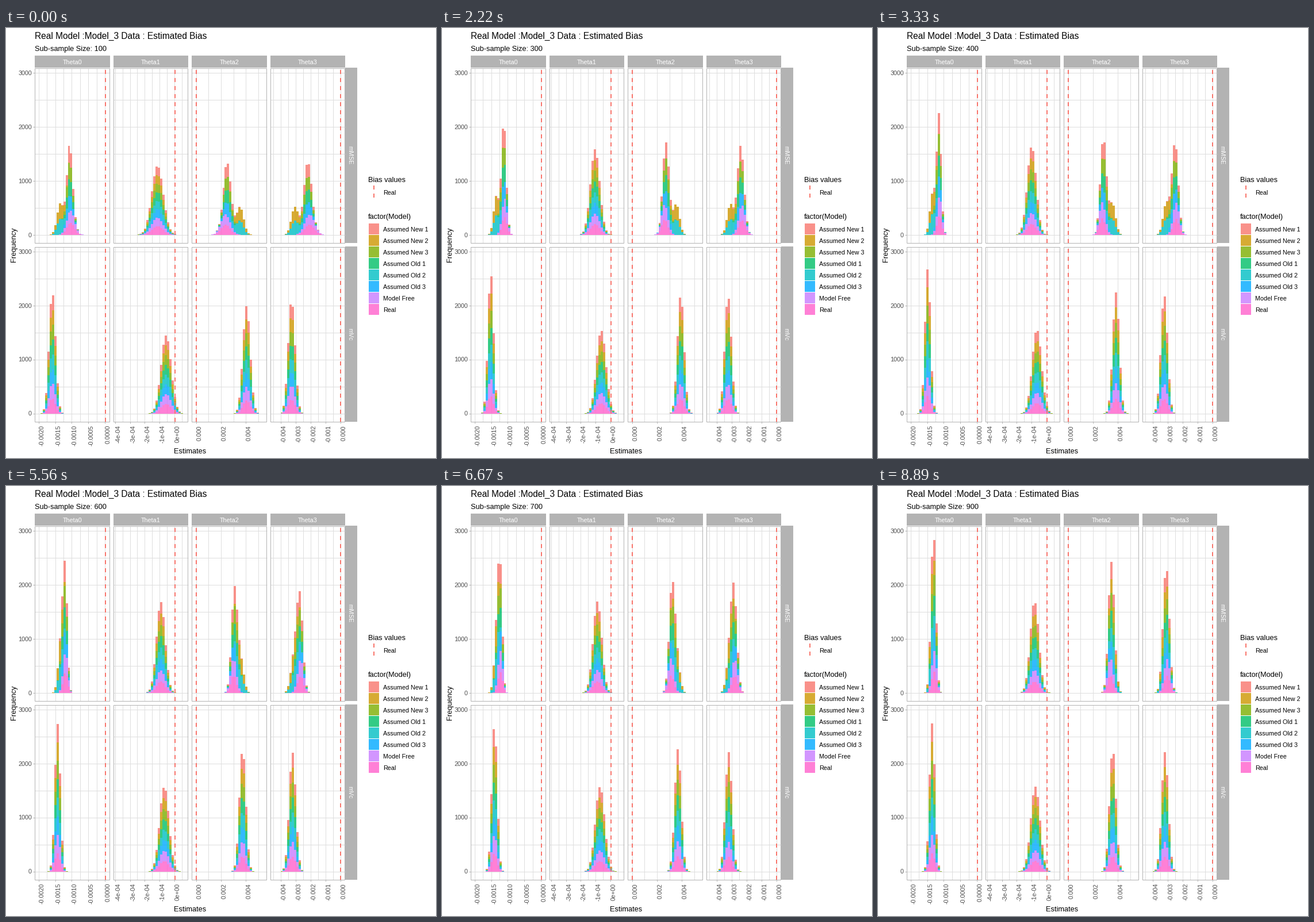
A matplotlib script for the animation above (10 s loop, 748 by 748 pixels).

```python
import numpy as np
import matplotlib.pyplot as plt
from matplotlib.animation import FuncAnimation
from matplotlib.collections import LineCollection, PolyCollection
from matplotlib.patches import Rectangle

plt.rcParams["font.family"] = "Liberation Sans"

SIZE, DPI = 748, 100
PX = 72 / DPI                      # points per pixel
GREY, GRID, TICK, RED = "#B3B3B3", "#DEDEDE", "#4D4D4D", "#F8766D"

MODELS = ["Assumed New 1", "Assumed New 2", "Assumed New 3", "Assumed Old 1",
          "Assumed Old 2", "Assumed Old 3", "Model Free", "Real"]
COLORS = ["#F8766D", "#CD9600", "#7CAE00", "#00BE67",
          "#00BFC4", "#00A9FF", "#C77CFF", "#FF61CC"]
EVERY, MAIN, SECOND, TRUE = [*range(8)], [0, 2, 3, 5], [1, 4], [6, 7]

RUNS = 1000                        # simulations per model
BIN = 3.95                         # bin width in pixels
PER_COUNT = 0.094                  # pixels per count
PANEL_W, PANEL_H, STEP, LEFT = 130.3, 304, 136.5, 50.3

ROWS = [("mMSE", 69.5, 360), ("mVc", 380.5, 671)]          # top, baseline
COLS = [("Theta0", 172.7, 28.9, lambda i: f"{i * 0.0005:.4f}"),   # zero, tick step
        ("Theta1", 293.7, 25.9, lambda i: f"{i * 1e-4:.0e}"),
        ("Theta2", 331.1, 43.4, lambda i: f"{i * 0.002:.3f}"),
        ("Theta3", 582.2, 26.0, lambda i: f"{i * 0.001:.3f}")]

# Per panel: models, then mean and spread (in bins) at the first and last size
BELLS = {
    (0, 0): [(MAIN, (-15.75, -19.31), (1.28, 1.0)),
             (SECOND, (-19.9, -19.9), (1.4, 1.05)),
             (TRUE, (-15.2, -19.05), (1.75, 1.02))],
    (0, 1): [(EVERY, (-7.6, -5.42), (2.5, 1.88))],
    (0, 2): [(MAIN, (13.8, 18.95), (1.6, 1.23)),
             (SECOND, (19.3, 19.7), (1.55, 1.35)),
             (TRUE, (12.9, 18.6), (2.1, 1.22))],
    (0, 3): [(MAIN, (-14.65, -20.4), (1.58, 1.32)),
             (SECOND, (-20.1, -20.9), (1.55, 1.37)),
             (TRUE, (-13.7, -20.0), (2.1, 1.26))],
    (1, 0): [(EVERY, (-23.35, -19.93), (1.41, 1.16))],
    (1, 1): [(EVERY, (-3.87, -5.05), (2.2, 2.02))],
    (1, 2): [(EVERY, (22.12, 19.57), (1.6, 1.4))],
    (1, 3): [(EVERY, (-21.53, -20.95), (1.51, 1.44))],
}
SLOTS = np.arange(-30, 31)
STAGES, FRAMES, LOOP = 9, 200, 10000

fig = plt.figure(figsize=(SIZE / DPI, SIZE / DPI), dpi=DPI, facecolor="white")
ax = fig.add_axes([0, 0, 1, 1])
ax.set(xlim=(0, SIZE), ylim=(SIZE, 0))
ax.axis("off")
rules = {GRID: [], GREY: []}


def mid(v):
    """Centre of the pixel that holds v."""
    return np.floor(v) + 0.5


def text(x, y, s, size, color="black", ha="left", rot=0):
    return ax.text(x, y, s, fontsize=size * PX, color=color, ha=ha, va="baseline",
                   rotation=rot, rotation_mode="anchor", zorder=6)


def box(x, y, w, h, color, **kw):
    ax.add_patch(Rectangle((x, y), w, h, fc=color, ec="none", lw=0, **kw))


def dashed(x, bottom, top):
    ax.plot([x, x], [bottom, top], color=RED, lw=2 * PX, zorder=4,
            ls=(0, (3.5, 3.5)), dash_capstyle="butt")


def span(col):
    left = LEFT + STEP * col
    return round(left), round(left + PANEL_W)


def draw_panel(col, row):
    _, zero, unit, label = COLS[col]
    _, top, base = ROWS[row]
    left, right = span(col)
    bottom = top + PANEL_H
    for half in range(7):
        y = mid(base - 0.5 - 500 * half * PER_COUNT)
        rules[GRID].append([(left, y), (right, y)])
        if col == 0 and half % 2 == 0:
            rules[GREY].append([(left - 3, y), (left, y)])
            text(45, y + 4, str(500 * half), 10.7, TICK, "right")
    for half in range(-10, 11):
        x = mid(zero + unit * half / 2)
        if not left < x < right:
            continue
        rules[GRID].append([(x, top), (x, bottom)])
        if row == 1 and half % 2 == 0:
            rules[GREY].append([(x, bottom), (x, bottom + 3)])
            text(x + 8, 691, label(half // 2), 10.7, TICK, "right", 90)
    dashed(round(zero), bottom, top)
    ax.add_patch(Rectangle((left + 0.5, top), right - left - 1, PANEL_H,
                           fc="none", ec=GREY, lw=PX, zorder=5))


def draw_frame():
    for col, spec in enumerate(COLS):
        for row in range(len(ROWS)):
            draw_panel(col, row)
        left, right = span(col)
        box(left, 48, right - left, 21, GREY)
        text((left + right) / 2, 63, spec[0], 10.7, "white", "center")
    for name, top, _ in ROWS:
        box(590, top - 0.5, 21, PANEL_H + 1, GREY)
        text(595.5, top + PANEL_H / 2, name, 10.7, "white", "center", 270)
    for color, segments in rules.items():
        ax.add_collection(LineCollection(segments, colors=color, linewidths=PX, zorder=1))
    text(50, 19, "Real Model :Model_3 Data : Estimated Bias", 15.5)
    text(320.5, 740, "Estimates", 12.8, ha="center")
    text(17, 376.5, "Frequency", 12.8, ha="center", rot=90)


def draw_legend():
    text(630, 268, "Bias values", 12.7)
    dashed(640, 295, 274)
    text(656, 289.5, "Real", 10.8)
    text(630, 332, "factor(Model)", 12.7)
    for i, (name, color) in enumerate(zip(MODELS, COLORS)):
        y = 340 + 20 * i
        box(631, y, 18, 19, color, alpha=0.8)
        text(656, y + 13.5, name, 10.8)


def counts(bells, t):
    """Histogram counts, one row per model; bells drift steadily and narrow early."""
    out = np.zeros((len(MODELS), len(SLOTS)))
    settle = 1 - np.exp(-6 * t)
    for members, (m0, m1), (s0, s1) in bells:
        drift = t ** 0.85 if members is EVERY else t
        mu, sd = m0 + (m1 - m0) * drift, s0 + (s1 - s0) * settle
        density = np.exp(-((SLOTS - mu) / sd) ** 2 / 2) / (sd * np.sqrt(2 * np.pi))
        out[members] = np.round(RUNS * density)
    return out


def stacks(t):
    """Bar outlines of each model, stacked from the last model upwards."""
    quads = [[] for _ in MODELS]
    for (row, col), bells in BELLS.items():
        x = np.round(COLS[col][1] + BIN * (np.append(SLOTS, SLOTS[-1] + 1) - 0.5))
        tops = np.cumsum(counts(bells, t)[::-1], axis=0)
        y = np.round(ROWS[row][2] - PER_COUNT * np.vstack([0 * tops[:1], tops]))
        for k, model in enumerate(reversed(quads)):
            for j in np.flatnonzero(y[k + 1] < y[k]):
                a, b, p, q = x[j], x[j + 1], y[k, j], y[k + 1, j]
                model.append([(a, p), (b, p), (b, q), (a, q)])
    return quads


draw_frame()
draw_legend()
subtitle = text(50, 40, "", 12.8)
bars = [PolyCollection([], facecolors=c, edgecolors="none", linewidths=0, alpha=0.8,
                       antialiaseds=False, zorder=3) for c in COLORS]
for coll in bars:
    ax.add_collection(coll, autolim=False)
scenes = [stacks(s / (STAGES - 1)) for s in range(STAGES)]


def update(i):
    stage = min((i + 1) * STAGES // FRAMES, STAGES - 1)
    subtitle.set_text(f"Sub-sample Size: {100 * (stage + 1)}")
    for coll, quads in zip(bars, scenes[stage]):
        coll.set_verts(quads)
    return [subtitle, *bars]


anim = FuncAnimation(fig, update, frames=FRAMES, interval=LOOP / FRAMES, repeat=True,
                     repeat_delay=0, blit=False)
plt.show()
```
